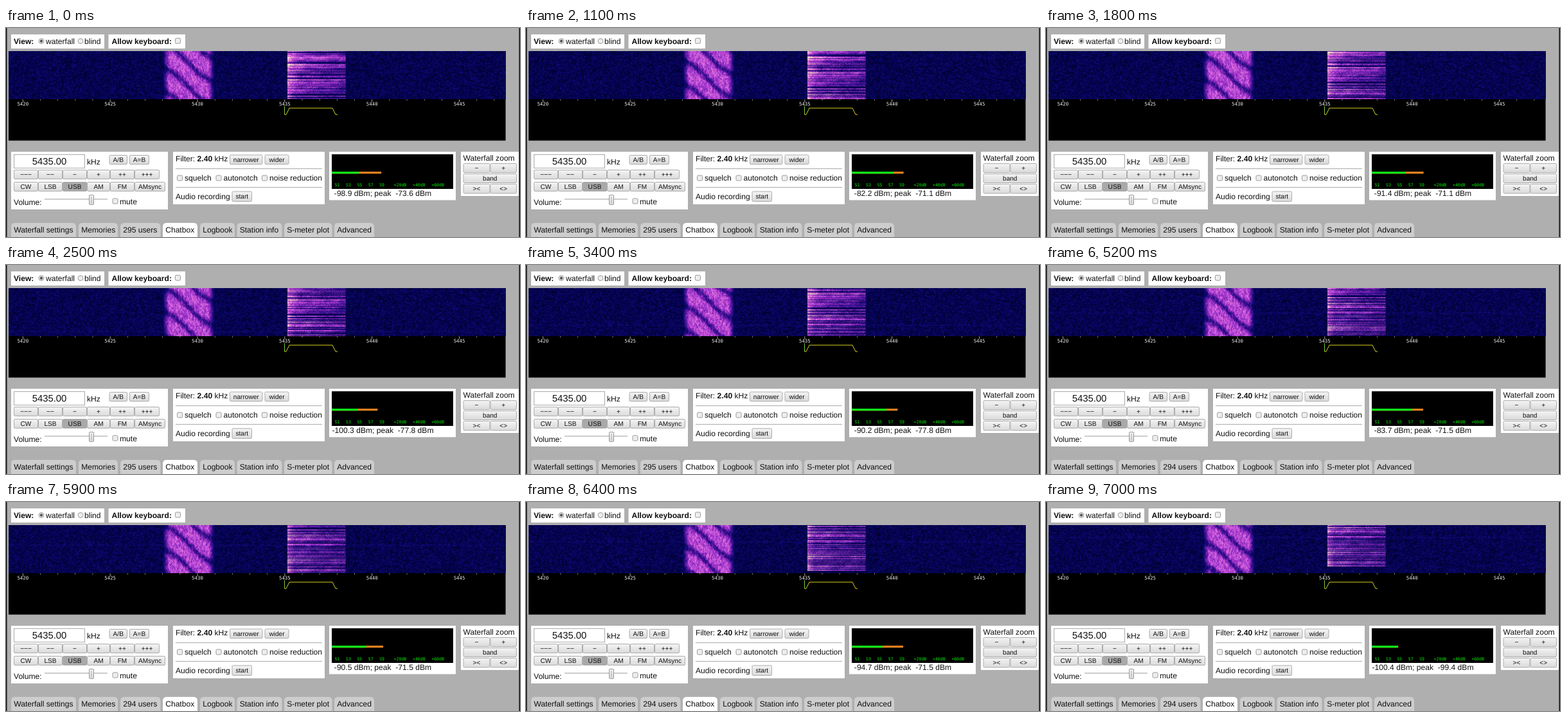
Animation, 800 px wide and 326 px high, one loop 7100 ms. Source, as an HTML page with a canvas:

```html
<!DOCTYPE html>
<html lang="en">
<head>
<meta charset="utf-8">
<title>Radio receiver</title>
<style>
html, body { margin: 0; width: 800px; height: 326px; overflow: hidden; background: #afafaf; }
canvas { position: absolute; left: 4px; top: 36.4px; }
svg { position: absolute; left: 0; top: 0; font: 12.1px "Liberation Sans", Arial, sans-serif; text-rendering: geometricPrecision; }
text { white-space: pre; fill: #111; }
.bold { font-weight: bold; }
.small { font-size: 10.1px; }
.big { font-size: 14.8px; }
.scale { font: 7.4px "DejaVu Sans Mono", monospace; fill: #eee; }
.meter { font: 6.5px "DejaVu Sans Mono", monospace; fill: #0e0; }
.mid { text-anchor: middle; }
</style>
</head>
<body>
<svg id="ui" width="800" height="326"></svg>
<canvas id="fall" width="774" height="75"></canvas>
<script>
const LOOP = 7100, STEP = 100;
const ROWS_PER_SECOND = 14.08, BINS = 1024, VIEW_ROWS = 99, ALL_ROWS = 200;

// ---- panel ----
const parts = [];
const rect = (x, y, x2, y2, fill, extra = '') =>
  parts.push(`<rect x="${x}" y="${y}" width="${x2 - x}" height="${y2 - y}" fill="${fill}" ${extra}/>`);
const text = (x, y, s, cls = '', id = '') =>
  parts.push(`<text x="${x}" y="${y}" class="${cls}" id="${id}">${s}</text>`);
const path = (d, stroke, fill = 'none') =>
  parts.push(`<path d="${d}" fill="${fill}" stroke="${stroke}"/>`);
const button = (x, y, x2, y2, label, fill = 'url(#face)') => {
  rect(x + .5, y + .5, x2 - .5, y2 - .5, fill, 'rx="1.5" stroke="#a5a5a5" stroke-width=".9"');
  text((x + x2) / 2, (y + y2) / 2 + 3.5, label, 'small mid');
};
const check = (x, y) => rect(x + .5, y + .5, x + 8.5, y + 8.5, '#eee', 'rx="1.5" stroke="#999"');
const radio = (x, on) => {
  parts.push(`<circle cx="${x}" cy="20.5" r="4" fill="#eee" stroke="#999"/>`);
  if (on) parts.push(`<circle cx="${x}" cy="20.5" r="2.2" fill="#555"/>`);
};

parts.push('<linearGradient id="face" x2="0" y2="1"><stop stop-color="#f4f4f4"/><stop offset="1" stop-color="#dadada"/></linearGradient>');
rect(0, 0, 1.5, 326, '#111');
rect(798.5, 0, 800, 326, '#111');

rect(8, 10, 153, 32, '#fff');
text(12, 25, 'View:', 'bold');
radio(55, true);
text(62, 25, 'waterfall');
radio(116);
text(122, 25, 'blind');
rect(159.5, 10, 279, 32, '#fff');
text(164.5, 25, 'Allow keyboard:', 'bold');
check(263, 15.5);

// frequency scale and passband
rect(4, 36.4, 777.6, 175.6, '#000');
for (let k = 0; k < 28; k++) {
  const x = 26.3 + k * 27.17;
  rect(x - .4, 111.4, x + .4, k % 5 ? 113 : 115.5, '#ccc');
  if (k % 5 === 0) text(x, 121, String(5420 + k), 'scale mid');
}
path('M433.5 122V135', '#7c3');
path('M433.5 135H436L441 125H508L513 135H516', '#d8d020');

// tuning
rect(8, 193, 252, 283, '#fff');
rect(12.5, 197.5, 122.5, 218.5, '#fff', 'stroke="#aaa"');
text(67.5, 213, '5435.00', 'big mid');
text(126, 213, 'kHz');
button(160.5, 198, 189, 213, 'A/B');
button(192, 198, 223, 213, 'A=B');
const edges = [12, 50, 88, 126, 162, 200, 239];
['−−−', '−−', '−', '+', '++', '+++'].forEach((s, i) => button(edges[i], 221, edges[i + 1], 236, s));
['CW', 'LSB', 'USB', 'AM', 'FM', 'AMsync'].forEach((s, i) =>
  button(edges[i], 240, i === 5 ? 248 : edges[i + 1], 255, s, i === 2 ? '#a9a9a9' : undefined));
text(12, 276, 'Volume:');
rect(60, 266, 158, 268, '#ccc');
rect(129.5, 260.5, 136.5, 275.5, 'url(#face)', 'rx="1.5" stroke="#999"');
path('M133 263V273', '#aaa');
check(165.5, 265.5);
text(177, 275, 'mute');

// filter
rect(260, 193, 496, 275, '#fff');
text(264, 208, 'Filter: <tspan class="bold">2.40</tspan> kHz');
button(348, 197.5, 399.5, 213, 'narrower');
button(402.5, 197.5, 440.5, 213, 'wider');
path('M264 219.5H492M264 248.5H492', '#aaa');
[[266, 'squelch'], [326.5, 'autonotch'], [398, 'noise reduction']].forEach(([x, s]) => {
  check(x, 229.5);
  text(x + 12, 238, s);
});
text(264, 267, 'Audio recording');
button(351.5, 254.5, 383, 271, 'start');

// S-meter
rect(503, 193, 700, 268.5, '#fff');
rect(507, 197, 696, 251, '#000');
rect(507, 224, 508, 227.3, '#e08020', 'id="peakBar"');
rect(507, 224, 508, 227.3, '#10e818', 'id="levelBar"');
['S1', 'S3', 'S5', 'S7', 'S9'].forEach((s, i) => text(515.5 + i * 17.4, 247, s, 'meter mid'));
['+20dB', '+40dB', '+60dB'].forEach((s, i) => text(613.5 + i * 29.3, 247, s, 'meter mid'));
text(507.5, 262, '', '', 'reading');

// zoom
rect(708, 193, 798, 262, '#fff');
text(711.5, 207, 'Waterfall zoom');
button(711.5, 211, 753.5, 226, '−');
button(753.5, 211, 795, 226, '+');
button(711.5, 227, 795, 242, 'band');
button(711.5, 243, 753.5, 258.5, '&gt;&lt;');
button(753.5, 243, 795, 258.5, '&lt;&gt;');

// tabs
[[8, 109, 'Waterfall settings'], [113, 174, 'Memories'], [178, 240.5, ''], [244, 298, 'Chatbox'],
 [302, 356, 'Logbook'], [359.5, 429.5, 'Station info'], [433, 507.5, 'S-meter plot'], [511, 573, 'Advanced']]
  .forEach(([x, x2, s]) => {
    path(`M${x} 326V310Q${x} 304 ${x + 6} 304H${x2 - 6}Q${x2} 304 ${x2} 310V326Z`,
      'none', s === 'Chatbox' ? '#fff' : '#cdcdcd');
    text(x + 4.2, 318.5, s, '', s ? '' : 'users');
  });

const $ = id => document.getElementById(id);
$('ui').innerHTML = parts.join('');

// ---- waterfall ----
const hash = (a, b = 0) => {
  let h = Math.imul(a + 1, 374761393) ^ Math.imul(b + 7, 668265263);
  h = Math.imul(h ^ h >>> 13, 1274126177);
  h = Math.imul(h ^ h >>> 15, 2246822519);
  return ((h ^ h >>> 16) >>> 0) / 4294967296;
};
// Noise blended between lattice points
const smooth = (x, y) => {
  const i = Math.floor(x), j = Math.floor(y), u = x - i, v = y - j;
  const top = hash(i, j) * (1 - u) + hash(i + 1, j) * u;
  const bottom = hash(i, j + 1) * (1 - u) + hash(i + 1, j + 1) * u;
  return top * (1 - v) + bottom * v;
};
const clamp = (v, a = 0, b = 1) => Math.min(b, Math.max(a, v));
const PALETTE = [[0, 0, 25], [3, 3, 85], [25, 10, 125], [100, 25, 165], [178, 62, 215], [238, 130, 220], [255, 240, 190]];
const colour = v => {
  const p = clamp(v, 0, .999) * 6, i = Math.floor(p);
  return PALETTE[i].map((c, k) => c + (PALETTE[i + 1][k] - c) * (p - i));
};

const background = (x, row) =>
  -.02 + .12 * hash(x, row) + .24 * smooth(x / 2.5, row / 2) + (Math.abs(row - 124) < 2 ? .05 : 0);

// Teletype band crossed by slanted fading stripes
function teletype(x, row) {
  const edge = clamp(Math.min(x - 316, 425 - x) / 14);
  if (!edge) return 0;
  const u = x - 370;
  const offset = row - 24 - .8 * u - 4 * Math.sin(u / 14);
  const d = ((offset + 24.5) % 49 + 49) % 49 - 24.5;
  const fade = .3 * Math.exp(-d * d / 55);
  return edge ** .6 * (.68 - fade + (hash(x, row) - .5) * .2 + (smooth(x / 2, row / 4) - .5) * .25);
}

// Voice sideband: streaks of uneven strength, loudest at the left edge
function voice(x, row) {
  const u = x - 574;
  if (u < 0 || u > 119 || row > 183) return 0;
  const dense = row < 85 ? .78 : .55;
  const streak = hash(row, 91) < dense ? .52 + .2 * hash(row, 17) : .22;
  const swell = .28 * (smooth(9, row / 6) - .5) + .22 * (smooth(u / 14, row / 5) - .5);
  const loud = .26 * Math.exp(-u / 12) - .1 * u / 119;
  return streak + swell + loud + (hash(x, row) - .5) * .26;
}

const sheet = document.createElement('canvas');
sheet.width = BINS;
sheet.height = ALL_ROWS;
const sheetCtx = sheet.getContext('2d');
const pixels = sheetCtx.createImageData(BINS, ALL_ROWS);
for (let row = 0, p = 0; row < ALL_ROWS; row++) {
  for (let x = 0; x < BINS; x++, p += 4) {
    pixels.data.set(colour(Math.max(background(x, row), teletype(x, row), voice(x, row))), p);
    pixels.data[p + 3] = 255;
  }
}
sheetCtx.putImageData(pixels, 0, 0);
const fall = $('fall').getContext('2d');
fall.imageSmoothingQuality = 'high';

// ---- motion ----
const LEVELS = [[0, -98.9], [1100, -82.2], [2500, -100.3], [3400, -90.2], [4500, -84.4], [5900, -90.5], [7000, -100.4], [7100, -98.9]];
const PEAKS = [[0, -73.6], [700, -71.1], [1900, -77.8], [3700, -73.4], [5000, -71.5], [6700, -99.4]];
const peakAt = t => PEAKS.findLast(([start]) => t >= start)[1];
function levelAt(t) {
  const i = LEVELS.findLastIndex(([start]) => t >= start);
  const [t0, a] = LEVELS[i], [t1, b] = LEVELS[i + 1];
  const u = (t - t0) / (t1 - t0);
  const flutter = Math.sin(Math.PI * u) * (hash(t, 3) - .5) * 18;
  return Math.min(a + (b - a) * u + flutter, peakAt(t) - 1);
}
const meterWidth = dbm => 42 + (dbm + 98.9) * 1.39;
const format = dbm => dbm.toFixed(1).padStart(6);

function draw(now) {
  const t = Math.floor(now % LOOP / STEP) * STEP;
  const top = Math.round(t / 1000 * ROWS_PER_SECOND);
  fall.drawImage(sheet, 0, top, BINS, VIEW_ROWS, 0, 0, 774, 75);
  const level = levelAt(t), peak = peakAt(t);
  $('levelBar').setAttribute('width', meterWidth(level));
  $('peakBar').setAttribute('width', meterWidth(peak));
  $('reading').textContent = `${format(level)} dBm; peak ${format(peak)} dBm`;
  $('users').textContent = `${t < 4000 ? 295 : 294} users`;
  requestAnimationFrame(draw);
}
draw(performance.now());
</script>
</body>
</html>
```
